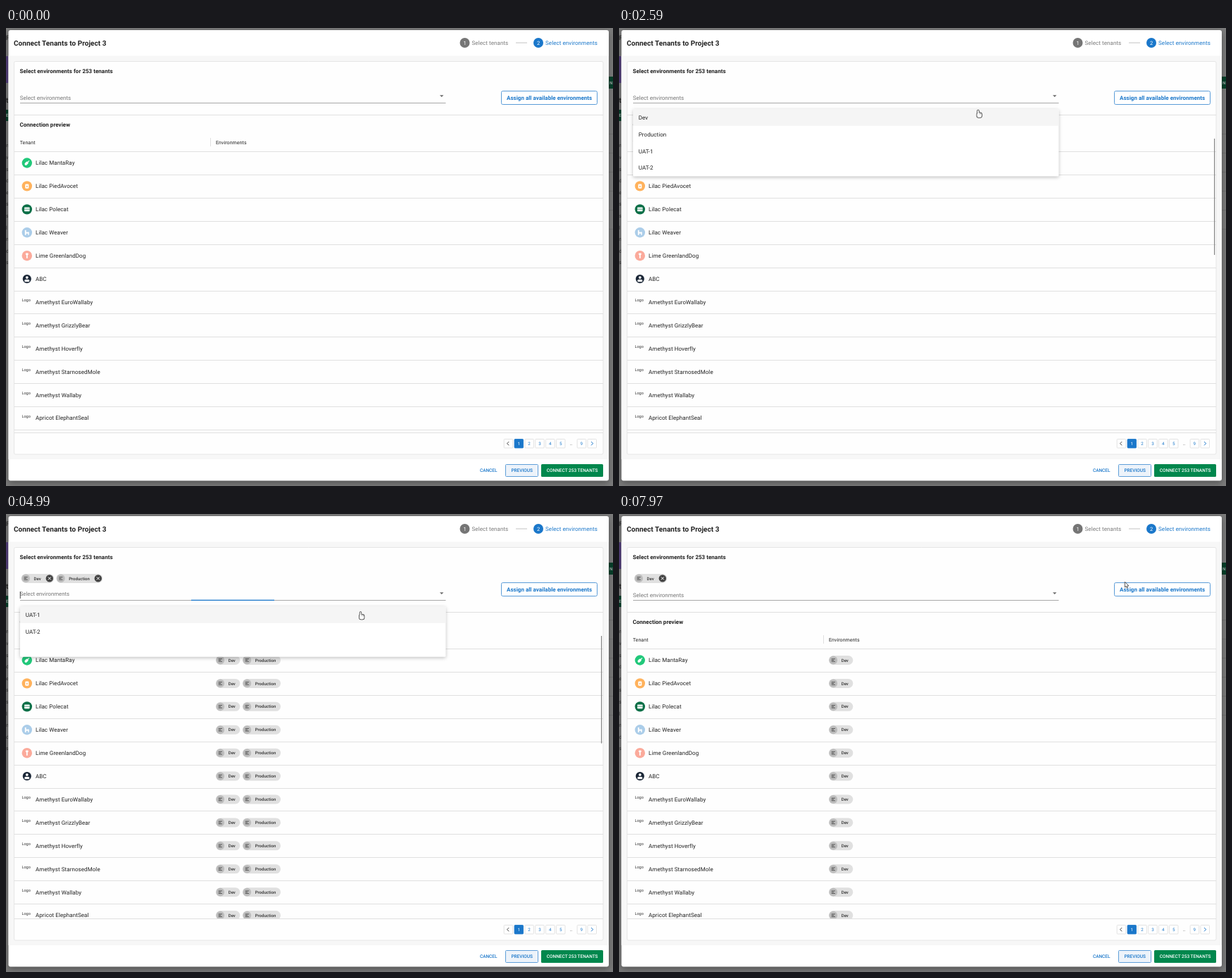
An HTML page with a canvas for the animation above (8000 ms loop, 862 px wide and 650 px high).

```html
<!DOCTYPE html>
<html lang="en">
<head>
<meta charset="utf-8">
<title>Connect tenants</title>
<style>
html, body { margin: 0; width: 862px; height: 650px; overflow: hidden; background: #7c7c7c; }
canvas { display: block; width: 862px; height: 650px; }
</style>
</head>
<body>
<canvas id="stage"></canvas>
<script>
const LOOP = 8000;
const BLUE = '#1a77ca', INK = '#212121', LINE = '#e0e0e0', GREEN = '#00874d';
const ROW = 32.92, ITEM = 23.75;
const canvas = document.getElementById('stage');
const dpr = window.devicePixelRatio || 1;
canvas.width = 862 * dpr;
canvas.height = 650 * dpr;
const c = canvas.getContext('2d');

const tenants = ['Lilac MantaRay', 'Lilac PiedAvocet', 'Lilac Polecat', 'Lilac Weaver',
  'Lime GreenlandDog', 'ABC', 'Amethyst EuroWallaby', 'Amethyst GrizzlyBear',
  'Amethyst Hoverfly', 'Amethyst StarnosedMole', 'Amethyst Wallaby', 'Apricot ElephantSeal'];
const iconColors = ['#21c87a', '#ffb25c', '#0b6f47', '#abcde9', '#fbaa9b', '#1a2636'];

// pointer legs: each eases on from where the last one ended, bowed sideways by bend
const legs = [
  { from: 240, to: 1520, x: 528, y: 90, bend: 28 },
  { from: 1520, to: 2590, x: 510, y: 117 },
  { from: 3070, to: 3670, x: 509.5, y: 115 },
  { from: 3940, to: 4400, x: 503.5, y: 139.5 },
  { from: 5580, to: 6860, x: 131, y: 91, bend: -8 },
  { from: 7510, to: 7970, x: 718, y: 96, bend: -9 }
];

const clamp = v => Math.max(0, Math.min(1, v));
const ramp = (t, a, b) => clamp((t - a) / (b - a));
const easeOut = v => 1 - (1 - v) ** 3;
const smooth = v => v * v * (3 - 2 * v);
const within = (t, a, b) => t >= a && t < b;

function pointerAt(t) {
  let x = 852, y = 652;
  for (const leg of legs) {
    if (t < leg.from) break;
    const u = smooth(ramp(t, leg.from, leg.to));
    const dx = leg.x - x, dy = leg.y - y;
    const bow = 4 * u * (1 - u) * (leg.bend || 0) / Math.hypot(dx, dy);
    x += dx * u - dy * bow;
    y += dy * u + dx * bow;
  }
  return [x, y];
}

function text(s, x, y, size, color = INK, weight = 400, spacing = 0, align = 'left', font = 'Roboto') {
  c.font = `${weight} ${size}px ${font}, sans-serif`;
  c.textRendering = 'geometricPrecision';
  c.letterSpacing = spacing + 'px';
  c.textAlign = align;
  c.fillStyle = color;
  c.fillText(s, x, y + size * 0.355);
}

const body = (s, x, y, color) => text(s, x, y, 8, color, 400, 0.075);
const bold = (s, x, y) => text(s, x, y, 8, INK, 700, 0.03);

function rect(x, y, w, h, color) {
  c.fillStyle = color;
  c.fillRect(x, y, w, h);
}

function box(x, y, w, h, r, fill, stroke, width = 1) {
  c.beginPath();
  c.roundRect(x, y, w, h, r);
  if (fill) { c.fillStyle = fill; c.fill(); }
  if (stroke) { c.strokeStyle = stroke; c.lineWidth = width; c.stroke(); }
}

function disc(x, y, r, color) {
  c.beginPath();
  c.arc(x, y, r, 0, 7);
  c.fillStyle = color;
  c.fill();
}

function stroke(points, color, width) {
  c.beginPath();
  points.forEach(p => c.lineTo(...p));
  c.strokeStyle = color;
  c.lineWidth = width;
  c.stroke();
}

function shadow(color, blur, dy) {
  c.shadowColor = color;
  c.shadowBlur = blur * dpr;
  c.shadowOffsetY = dy * dpr;
}

function page() {
  rect(0, 0, 862, 650, '#7c7c7c');
  rect(0, 40, 4, 38, '#54407c');
  rect(0, 116, 4, 16, '#06402a');
  text('F', 0, 14, 9, '#2a2a2a', 500);
  text('t', 0, 102, 10, '#222', 700);
  text('E', 0, 124, 6, '#bbb', 500);
  [...'nvsdesslnds'].forEach((s, i) => text(s, 0, 167 + i * 16.6, 7, '#333'));
  rect(856, 69, 6, 17, '#06402a');
  text('N', 857, 78, 6, '#bbb', 500);
  for (let i = 0; i < 6; i++) rect(856, 150 + i * 27, 6, 1, '#707070');
}

function dialog() {
  c.save();
  shadow('rgba(0,0,0,.35)', 10, 3);
  box(3.5, 3, 852.5, 639.5, 3, '#fff');
  c.restore();
  rect(3.5, 39.5, 852.5, 572.5, '#f7f7f7');
  box(11.5, 47.5, 836.5, 557.5, 2, '#fefefe', '#e6e6e6');

  text('Connect Tenants to Project 3', 11, 21, 10, INK, 700, 0.05);
  disc(651.5, 21, 7, '#757575');
  text('1', 651.5, 21, 7.5, '#fff', 400, 0, 'center');
  body('Select tenants', 661.5, 21, '#7a7a7a');
  rect(724, 20.5, 16, 1, '#c4c4c4');
  disc(756, 21, 7, BLUE);
  text('2', 756, 21, 7.5, '#fff', 400, 0, 'center');
  body('Select environments', 766, 21, BLUE);
  bold('Select environments for 253 tenants', 19.5, 61.5);

  pager();
  const action = (s, x, color) => text(s, x, 628, 6.5, color, 500, 0, 'center');
  action('CANCEL', 685.2, BLUE);
  box(709.5, 619.5, 46, 17, 1, '#edf3fa', '#5f9fd9');
  action('PREVIOUS', 732.7, BLUE);
  box(760, 619, 88, 18, 1.5, GREEN);
  action('CONNECT 253 TENANTS', 804.2, '#fff');
}

function pager() {
  const y = 589.7, step = 14.85;
  const chevron = (x, dir, color) =>
    stroke([[x - dir, y - 2.6], [x + 1.6 * dir, y], [x - dir, y + 2.6]], color, 1);
  ['', '1', '2', '3', '4', '5', '…', '9', ''].forEach((s, i) => {
    const x = 713.4 + i * step, on = s === '1';
    if (s !== '…') box(x - 6.2, y - 6.2, 12.5, 12.5, 1, on ? BLUE : '#fff', on ? BLUE : '#dcdcdc', 0.8);
    text(s, x, y, 6.2, on ? '#fff' : s === '…' ? '#666' : BLUE, 400, 0, 'center');
  });
  chevron(713.2, -1, '#444');
  chevron(832, 1, BLUE);
}

function avatar(i, y) {
  if (i > 5) return text('Logo', 22.4, y - 3, 5.6, '#333', 400, 0, 'left', '"Liberation Sans"');
  c.save();
  c.translate(29.8, y);
  disc(0, 0, i === 5 ? 6.1 : 7.2, iconColors[i]);
  if (i === 0) {
    c.rotate(Math.PI / 4);
    box(-1.8, -2, 3.6, 6, 1.8, '#fff');
    rect(-0.6, -4.5, 1.2, 3, '#fff');
  } else if (i === 1) {
    box(-2.5, -3, 5, 6.4, 1.2, '#fff');
    rect(-0.8, -0.6, 1.6, 2, iconColors[i]);
  } else if (i === 2) {
    box(-3.8, -2.8, 7.6, 5.6, 0.8, '#fff');
    rect(-3.8, -0.6, 7.6, 0.7, iconColors[i]);
  } else if (i === 3) {
    rect(-3, -3.4, 1.8, 7, '#fff');
    rect(-2, -0.6, 4.6, 2, '#fff');
    rect(1.4, -0.6, 1.4, 4.2, '#fff');
  } else if (i === 4) {
    box(-1.9, -3.6, 3.8, 2.4, 0.8, '#fff');
    rect(-0.9, -2, 1.8, 5.6, '#fff');
  } else {
    disc(0, -2, 1.9, '#fff');
    box(-3.6, 1, 7.2, 3.2, 1.6, '#fff');
  }
  c.restore();
}

function chip(x, y, w, label, closable, focused) {
  box(x, y - 6.5, w, 13, 6.5, focused ? '#ccd5dc' : '#e0e0e0', focused && '#86b6de', 0.9);
  disc(x + 6.3, y, 5.9, '#bdbdbd');
  for (let i = -1; i < 2; i++) rect(x + 3.7, y - 0.5 + i * 1.8, i ? 5.2 : 3.4, 1, '#555');
  text(label, x + 17.7, y, 6, '#333', 500, 0.03);
  if (!closable) return;
  const px = x + w - 6.4;
  disc(px, y, 5.2, focused ? '#263238' : '#424242');
  for (const d of [-2, 2]) stroke([[px - 2, y - d], [px + 2, y + d]], '#fff', 1);
}

function list(shift, envs) {
  const top = 175 + shift;
  rect(12, 123 + shift, 836, 1, LINE);
  bold('Connection preview', 19.5, 137 + shift);
  text('Tenant', 19.7, 162.7 + shift, 7, INK, 400, 0.075);
  text('Environments', 298, 162.7 + shift, 7, INK, 400, 0.075);
  rect(290, 156 + shift, 1, 12, LINE);
  rect(12, top, 836, 1, LINE);
  c.save();
  c.beginPath();
  c.rect(12, top, 836, 574 - top);
  c.clip();
  tenants.forEach((name, i) => {
    const y = top + 16.5 + i * ROW;
    avatar(i, y);
    body(name, 42, y);
    if (envs > 0) chip(298, y, 34.3, 'Dev');
    if (envs > 1) chip(336, y, 54, 'Production');
    rect(12, Math.round(top + (i + 1) * ROW), 836, 1, LINE);
  });
  c.restore();
  rect(12, 574, 836, 1, LINE);
}

function field(shift, hover, pulse, caret) {
  c.save();
  c.translate(19.7, 99.5 + shift - 2.3 * pulse);
  c.scale(1 - 0.03 * pulse, 1 - 0.03 * pulse);
  text('Select environments', 0, 0, 8, '#767676');
  c.restore();
  rect(20, 106 + shift, 604.5, 1, hover ? '#555' : '#a8a8a8');
  const w = 118 * pulse;
  rect(322 - w / 2, 105.7 + shift, w, 1.3, BLUE);
  if (caret) rect(19.8, 94 + shift, 0.8, 10, '#222');
  c.beginPath();
  c.moveTo(616, 95.3 + shift);
  c.lineTo(621.4, 95.3 + shift);
  c.lineTo(618.7, 98 + shift);
  c.fillStyle = '#6b6b6b';
  c.fill();
  const y = 99 + shift / 2;
  box(703.5, y - 9.5, 136, 19, 2, '#fff', '#5b9cd8');
  text('Assign all available environments', 771.6, y + 0.2, 8, BLUE, 700, 0.02, 'center');
}

function menu(y, rows, items, alpha, grow, hover) {
  if (alpha <= 0) return;
  c.save();
  c.globalAlpha = alpha;
  c.translate(20, y);
  c.scale(1, 0.75 + 0.25 * grow);
  c.save();
  shadow('rgba(0,0,0,.25)', 5, 1.5);
  box(0, 0, 604.5, rows * ITEM + 0.5, 1.5, '#fff');
  c.restore();
  if (hover) rect(0, 0, 604.5, ITEM, '#f5f5f5');
  items.forEach((s, i) => body(s, 7.7, (i + 0.5) * ITEM + 0.3));
  c.restore();
}

function pointer(x, y, kind) {
  c.save();
  c.translate(x, y);
  if (kind === 'beam') {
    rect(-0.4, -4, 0.8, 8, '#444');
    for (const d of [-4.4, 3.7]) rect(-2, d, 4, 0.7, '#555');
  } else if (kind === 'hand') {
    for (const outline of ['#333', null]) {
      box(-0.9, -0.4, 1.8, 7, 0.9, '#fff', outline, 1.6);
      box(-1.6, 3.2, 6.6, 6.8, 2.2, '#fff', outline, 1.6);
    }
    for (const d of [1.8, 3.4]) rect(d, 3.6, 0.6, 1.8, '#666');
  } else {
    c.beginPath();
    c.moveTo(0.4, 0.3);
    c.lineTo(0.4, 8);
    c.lineTo(2.2, 6.5);
    c.lineTo(3.3, 9.2);
    c.lineTo(4.6, 8.6);
    c.lineTo(3.5, 6);
    c.lineTo(5.9, 5.9);
    c.closePath();
    c.fillStyle = '#fff';
    c.fill();
    c.strokeStyle = '#333';
    c.lineWidth = 0.8;
    c.stroke();
  }
  c.restore();
}

function draw(t) {
  c.setTransform(dpr, 0, 0, dpr, 0, 0);
  const envs = t < 3140 ? 0 : within(t, 4930, 6990) ? 2 : 1;
  const shift = envs ? 16 : 0;
  const open1 = easeOut(ramp(t, 1920, 2150)), open2 = easeOut(ramp(t, 3960, 4180));
  const alpha1 = open1 * (1 - ramp(t, 3140, 3340));
  const alpha2 = open2 * (1 - ramp(t, 5050, 5190));
  // the field takes the focus for a moment after each change
  const pulse = ramp(t, 4930, 4990) * (1 - ramp(t, 5060, 5190)) +
    ramp(t, 6870, 6930) * (1 - ramp(t, 6990, 7050));

  const [x, y] = pointerAt(t);
  const menuTop = 115 + shift;
  const overMenu = (alpha1 > 0.3 || alpha2 > 0.3) && y >= menuTop;
  const overField = !overMenu && x < 625 && y > 90.5 + shift && y < 107 + shift;

  page();
  dialog();
  list(shift, envs);
  field(shift, overField, pulse, within(t, 4900, 5100));
  if (envs > 0) chip(21.8, 91.4, 46.4, 'Dev', true);
  if (envs > 1) chip(71.5, 91.4, 65.7, 'Production', true, t >= 6860);

  c.globalAlpha = ramp(t, 380, 440) * (1 - ramp(t, 5600, 5800));
  rect(845, 157 + shift, 1.2, shift ? 152.5 : 165, '#858585');
  c.globalAlpha = 1;

  const items = ['Dev', 'Production', 'UAT-1', 'UAT-2'];
  menu(menuTop, 4, items, alpha1, open1, overMenu);
  menu(menuTop, 3, items.slice(t < 4930 ? 1 : 2), alpha2, open2, overMenu);
  if (t >= 200) pointer(x, y, overMenu ? 'hand' : overField ? 'beam' : 'arrow');
}

const start = performance.now();
function frame() {
  draw((performance.now() - start) % LOOP);
  requestAnimationFrame(frame);
}
frame();
</script>
</body>
</html>
```
